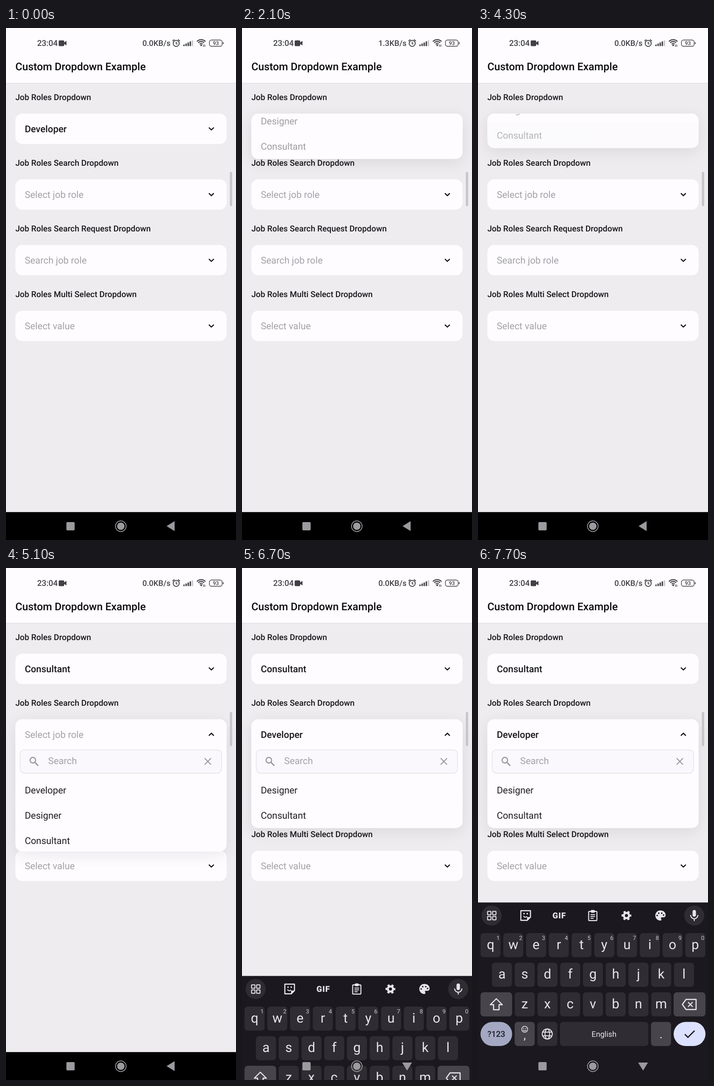
These frames come from a looping animation (502 px wide and 1115 px high, 8000 ms). An HTML page:

```html
<!DOCTYPE html>
<html lang="en">
<head>
<meta charset="utf-8">
<title>Custom Dropdown Example</title>
<style>
  html, body { margin: 0; width: 100%; height: 100%; overflow: hidden; background: #eeecee; }
  svg { display: block; font-family: Roboto, sans-serif; text-rendering: geometricPrecision; }
</style>
</head>
<body>
<svg id="stage" width="502" height="1115" viewBox="0 0 502 1115"></svg>
<script>
const LOOP = 8000, STEP = 100;
const WHITE = '#fefcff', INK = '#18171b', HINT = '#a3a2a6', STATUS = '#414045';
const KEY = '#2f2d33', KEY_ALT = '#47454b', GLYPH = '#e8e6ec', BOARD = '#1b191f', NAV = '#9b9a9e';
const LEFT = 20.5, WIDTH = 461, HEAD = 66, ROW = 55, SEARCH = 61;
const ROLES = ['Developer', 'Designer', 'Consultant'];
const LABELS = ['', 'Search ', 'Search Request ', 'Multi Select '];

// Each track holds [start, values]; one value per step, the last one stays.
const CLOSE = [.96, .8, .325, 0];
const OPEN = [.428, .86, .98, 1];
const SLOW_OPEN = [.09, .56, .89, .99, 1];
const PLAIN = [[200, SLOW_OPEN], [1600, CLOSE], [2100, OPEN], [2900, CLOSE],
  [3300, [.03, ...OPEN]], [4100, CLOSE]];
const SEARCHABLE = [[4500, SLOW_OPEN], [5400, CLOSE], [6000, [.83, .97, 1]]];
const KEYBOARD = [[6600, [330, 160, 55, 15.5, 4, 1, 0]]];

function valueAt(track, t, initial) {
  let value = initial;
  for (const [start, values] of track)
    if (t >= start) value = values[Math.min(Math.floor((t - start) / STEP), values.length - 1)];
  return value;
}

const text = (x, y, s, size, fill, weight = 400, anchor = 'start') =>
  `<text x="${x}" y="${y}" font-size="${size}" fill="${fill}" font-weight="${weight}" text-anchor="${anchor}">${s}</text>`;
const rect = (x, y, w, h, fill, r = 0, extra = '') =>
  `<rect x="${x}" y="${y}" width="${w}" height="${h}" rx="${r}" fill="${fill}" ${extra}/>`;
const disc = (x, y, r, fill, extra = '') => `<circle cx="${x}" cy="${y}" r="${r}" fill="${fill}" ${extra}/>`;
const shape = (d, fill) => `<path d="${d}" fill="${fill}"/>`;
const line = (d, color, w, cap = 'butt') =>
  `<path d="${d}" fill="none" stroke="${color}" stroke-width="${w}" stroke-linecap="${cap}" stroke-linejoin="${cap === 'round' ? 'round' : 'miter'}"/>`;
const group = (attrs, body) => `<g ${attrs}>${body}</g>`;

const fieldTop = i => 186.4 + 143.1 * i;

function header(top, value, hint, up) {
  const y = top + 33, d = up ? -2.6 : 2.6;
  return text(40.9, y + 7.2, value || hint, 20.45, value ? INK : HINT, value ? 500 : 400) +
    line(`M442.8 ${y - d}l5.4 ${2 * d}l5.4 ${-2 * d}`, '#08080a', 2.2);
}

function searchBox(y, cursor) {
  return rect(31, y, 439.5, 50.5, '#faf8fc', 9, 'stroke="#e3e1e6" stroke-width="1.4"') +
    disc(58.6, y + 22.4, 6.1, 'none', 'stroke="#98979b" stroke-width="2.4"') +
    line(`M63 ${y + 26.8}l7.5 7.7`, '#98979b', 2.7) +
    text(92, y + 31, 'Search', 20.45, HINT) +
    line(`M433.5 ${y + 18}l14 14m0 -14l-14 14`, '#98979b', 2) +
    (cursor ? rect(92, y + 12, 2.5, 25, '#3f51b5') : '');
}

// An open menu unrolls from the top edge; its content is fixed to the bottom edge.
function menu(i, p, value, items, selected, search, cursor) {
  if (!p) return '';
  const top = fieldTop(i);
  const full = Math.min(HEAD + (search ? SEARCH : 0) + ROW * items.length, 288);
  const height = full * p, start = top + height - full;
  let body = header(start, value, 'Select job role', true);
  let y = start + HEAD;
  if (search) {
    body += searchBox(y + .7, cursor);
    y += SEARCH;
  }
  for (const item of items) {
    if (item === selected) body += rect(LEFT, y, WIDTH, ROW, '#f5f4f6');
    body += text(40.9, y + 34.4, item, 20.45, '#1f1e22');
    y += ROW;
  }
  const box = fill => rect(LEFT, top, WIDTH, height, fill, 15);
  return rect(LEFT, top + 8, WIDTH, height, '#000', 15, 'opacity=".08" filter="url(#blur)"') + box(WHITE) +
    `<clipPath id="menu${i}">${box('#000')}</clipPath>` +
    group(`clip-path="url(#menu${i})"`, group(`opacity="${p}"`, body));
}

function statusBar(speed) {
  let s = text(68, 39, '23:04', 17.7, STATUS, 500) + text(359, 39, speed + 'KB/s', 17.1, STATUS, 500, 'end') +
    rect(115, 27, 12, 12.5, STATUS, 2) + shape('M126 32l6 -4v10l-6 -4z', STATUS) +
    disc(371.5, 33.5, 6.6, 'none', `stroke="${STATUS}" stroke-width="1.9"`) +
    line('M371.5 30v4l2.5 1.5M363.5 28.5l4 -3.5M379.5 28.5l-4 -3.5', STATUS, 1.8);
  for (let i = 0; i < 5; i++)
    s += rect(387 + 4.6 * i, 36 - 2.3 * i, 3, 3.6 + 2.3 * i, i < 4 ? STATUS : '#c3c2c6', 1);
  for (const r of [4.5, 8.6, 12.7])
    s += line(`M${426 - r * .74} ${38 - r * .67}A${r} ${r} 0 0 1 ${426 + r * .74} ${38 - r * .67}`, STATUS, 2.1);
  return s + disc(426, 37.5, 2, STATUS) + line('M431 36v5M434 36v5', STATUS, 1.3) +
    rect(444, 26.3, 27.8, 13.4, 'none', 4.5, `stroke="${STATUS}" stroke-width="1.4"`) +
    rect(473.3, 31, 1.8, 4, STATUS, 1) + text(458, 37.2, '93', 11.5, STATUS, 500, 'middle');
}

function navBar(typing) {
  return rect(131.8, 1076, 18, 18, NAV, 2) + disc(250.6, 1085, 11.6, 'none', `stroke="${NAV}" stroke-width="1.7"`) +
    disc(250.6, 1085, 8.1, NAV) +
    shape(typing ? 'M349.5 1077h21.5l-10.7 17.5z' : 'M368 1074v21.5l-17.5 -10.7z', NAV);
}

function toolbar() {
  const y = 756.8;
  let s = disc(29.7, y, 21.9, KEY) + disc(472, y, 21.9, KEY);
  for (const dx of [-9, 2]) for (const dy of [-9, 2])
    s += rect(29.8 + dx, y + dy, 7.5, 7.5, 'none', 1, `stroke="${GLYPH}" stroke-width="2"`);
  s += line(`M93.5 ${y - 10.5}h21v14l-7 7h-14z`, GLYPH, 2.4, 'round') + shape(`M107 ${y + 11}v-7.5h7.5z`, GLYPH) +
    disc(100.5, y - 4, 1.7, GLYPH) + disc(107.5, y - 4, 1.7, GLYPH) + line(`M99 ${y + 1}q4 5 8 1`, GLYPH, 2) +
    group('letter-spacing=".8"', text(177.4, y + 6.3, 'GIF', 17.8, GLYPH, 900, 'middle')) +
    rect(241.5, y - 9, 18, 20, 'none', 1.5, `stroke="${GLYPH}" stroke-width="2.2"`) +
    rect(246, y - 12, 9, 6, GLYPH, 2) + line(`M245.5 ${y - 2}h10m-10 4h10m-10 4h7`, GLYPH, 1.9) +
    disc(324, y, 5.7, 'none', `stroke="${GLYPH}" stroke-width="4.6"`) +
    disc(324, y, 8.7, 'none', `stroke="${GLYPH}" stroke-width="4" stroke-dasharray="4.555" stroke-dashoffset="2.28"`) +
    shape(`M398 ${y - 11}a11 11 0 1 0 0 22c3 0 2.5 -3 1.5 -4.5q-1 -2.5 2 -2.5h3q5 0 5 -5c0 -6 -5 -10 -11.5 -10z`, GLYPH);
  for (const [dx, dy] of [[-7, 0], [-3.5, -5], [3, -5], [7, -1]]) s += disc(398 + dx, y + dy, 1.7, BOARD);
  return s + rect(468.3, y - 12, 7.4, 14.5, GLYPH, 3.7) +
    line(`M464 ${y - 1}a8 8 0 0 0 16 0M472 ${y + 7}v5`, GLYPH, 2.2);
}

function keyboard(offset) {
  let s = rect(0, 728.4, 502, 480, BOARD) + toolbar();
  const key = (x, y, w, fill = KEY, r = 7) => rect(x, y, w, 52.6, fill, r);
  [['qwertyuiop', 5.5, 795], ['asdfghjkl', 30.4, 859.5], ['zxcvbnm', 80, 924]].forEach(([letters, x0, y], row) => {
    [...letters].forEach((c, i) => {
      const x = x0 + 49.65 * i;
      s += key(x, y, 43.8) + text(x + 21.9, y + 34.5, c, 29, GLYPH, 400, 'middle');
      if (!row) s += text(x + 38.2, y + 14.5, (i + 1) % 10, 12.5, '#cfcdd3', 400, 'middle');
    });
  });
  s += key(5.5, 924, 69, KEY_ALT) + line('M40 938l-13 13h7v11h12v-11h7z', GLYPH, 2.4, 'round') +
    key(427, 924, 69.5, KEY_ALT) + line('M446 950.5l8 -11h22v22h-22z', GLYPH, 2.4, 'round') +
    line('M458.5 945.5l10 10m0 -10l-10 10', GLYPH, 2.3);
  const y = 988.5, mid = y + 26.3;
  s += key(5.5, y, 69, '#a4a8c3', 26.3) + text(40, mid + 6.5, '?123', 17.8, '#1d1c25', 500, 'middle') +
    key(80, y, 43.8, KEY_ALT) + disc(102, y + 16, 6.5, 'none', `stroke="${GLYPH}" stroke-width="1.5"`) +
    disc(99.7, y + 14.5, 1.1, GLYPH) + disc(104.3, y + 14.5, 1.1, GLYPH) + line(`M98.5 ${y + 17.5}q3.5 4 7 0`, GLYPH, 1.5) +
    text(102, y + 37, ',', 25, GLYPH, 400, 'middle') +
    key(129.5, y, 43.8) + disc(151.2, mid, 11, 'none', `stroke="${GLYPH}" stroke-width="2"`) +
    `<ellipse cx="151.2" cy="${mid}" rx="5" ry="11" fill="none" stroke="${GLYPH}" stroke-width="1.9"/>` +
    line(`M141 ${mid - 4}h20.4m-20.4 8h20.4`, GLYPH, 1.9) +
    key(178.8, y, 193) + text(275, mid + 6, 'English', 16.8, GLYPH, 400, 'middle') +
    key(377.5, y, 43.8, KEY_ALT) + text(399.4, mid + 9, '.', 26, GLYPH, 400, 'middle') +
    key(427, y, 69.5, '#dce1ff', 26.3) + line(`M451.5 ${mid + .5}l6.7 6.8l14.5 -14.5`, '#15141a', 2.6);
  return group(`transform="translate(0 ${offset})"`, s);
}

function scene(t) {
  const role = t < 2800 ? ROLES[0] : ROLES[2];
  const found = t < 5400 ? '' : ROLES[0];
  const values = [role, found, '', ''];
  const hints = ['', 'Select job role', 'Search job role', 'Select value'];
  const speed = t >= 1000 && t < 4100 ? '1.3' : '0.0';
  const cursor = (t >= 6500 && t < 6700) || (t >= 7200 && t < 7700);
  const offset = valueAt(KEYBOARD, t, null), typing = offset !== null;

  let s = '<filter id="blur" x="-30%" y="-150%" width="160%" height="400%"><feGaussianBlur stdDeviation="17"/></filter>' +
    rect(0, 0, 502, 1115, '#eeecee') + rect(0, 0, 502, 120, WHITE) + rect(0, 119.6, 502, 1.2, '#dddbdf') +
    statusBar(speed) + text(20.45, 92.3, 'Custom Dropdown Example', 23, '#0b0a0d', 500);
  LABELS.forEach((label, i) => {
    const top = fieldTop(i);
    s += text(20.45, top - 29.4, `Job Roles ${label}Dropdown`, 17.9, INK, 500) +
      rect(LEFT, top, WIDTH, 66, WHITE, 15) + header(top, values[i], hints[i], false);
  });
  s += menu(0, valueAt(PLAIN, t, 0), role, ROLES, role, false) +
    menu(1, valueAt(SEARCHABLE, t, 0), found, t < 5800 ? ROLES : ROLES.slice(1), found, true, cursor) +
    rect(488.6, 313.5, 5, 74.5, '#c6c5c8', 2) + rect(0, 1054.2, 502, 61, '#000');
  if (typing) s += keyboard(offset);
  return s + navBar(typing);
}

const stage = document.getElementById('stage');
const begin = performance.now();
let shown = -1;
function draw() {
  const t = Math.floor((performance.now() - begin) % LOOP / STEP) * STEP;
  if (t !== shown) stage.innerHTML = scene(shown = t);
  requestAnimationFrame(draw);
}
draw();
</script>
</body>
</html>
```
